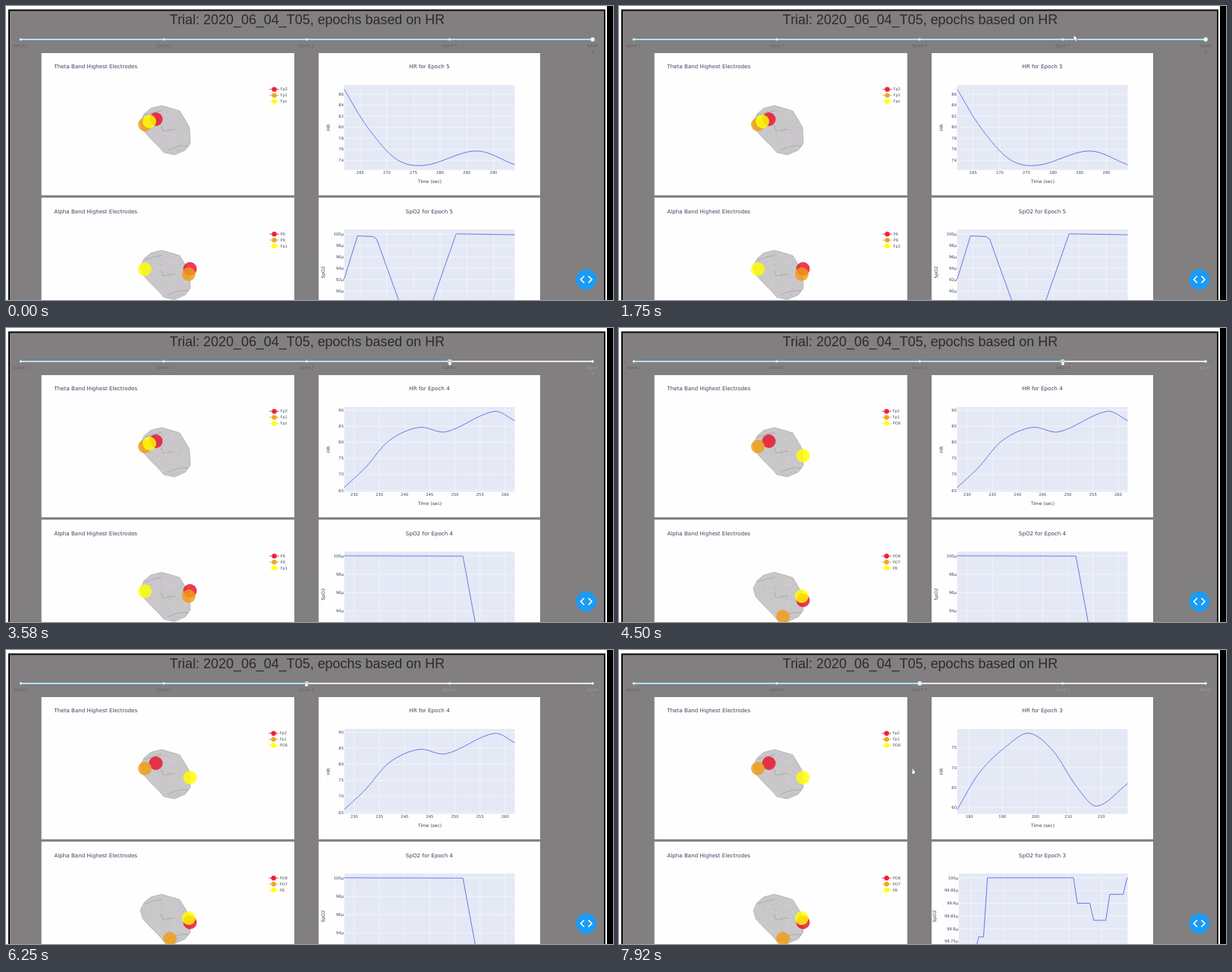
Recreate the animation shown at these times as an HTML page with a canvas. Size 800x387 px, loop 8 s.

```html
<!DOCTYPE html>
<html lang="en">
<head>
<meta charset="utf-8">
<title>Trial dashboard</title>
<style>
  html, body { margin: 0; width: 100%; height: 100%; overflow: hidden; background: #827f80; }
  canvas { display: block; }
</style>
</head>
<body>
<canvas id="stage" width="800" height="387"></canvas>
<script>
const ctx = document.getElementById('stage').getContext('2d');
const LOOP = 8000;
const GRAY = '#827f80', INK = '#38425a', LINE = '#686ee8';
const RANK_COLORS = ['#e8112d', '#f09c14', '#ffff00'];
const PLOT_FONT = '"DejaVu Sans", Verdana, sans-serif';
const UI_FONT = '"Liberation Sans", Arial, sans-serif';

// Smooth curve through a few key points, with slopes taken from the neighbours.
function smooth(keys) {
  const last = keys.length - 1;
  const slope = i => {
    const a = keys[Math.max(i - 1, 0)], b = keys[Math.min(i + 1, last)];
    return (b[1] - a[1]) / (b[0] - a[0]);
  };
  const points = [keys[0]];
  for (let i = 0; i < last; i++) {
    const [x0, y0] = keys[i], [x1, y1] = keys[i + 1], w = x1 - x0;
    for (let k = 0.125; k <= 1; k += 0.125) {
      const ease = k * k * (3 - 2 * k);
      const bend = w * k * (1 - k) * (slope(i) * (1 - k) - slope(i + 1) * k);
      points.push([x0 + w * k, y0 + (y1 - y0) * ease + bend]);
    }
  }
  return points;
}

// Plateaus joined by short ramps; each step is [time, new level].
function plateaus(start, end, level, steps) {
  const points = [[start, level]];
  for (const [x, next] of steps) {
    points.push([x - 0.6, level], [x + 0.6, next]);
    level = next;
  }
  return [...points, [end, level]];
}

const epochs = {
  5: {
    hr: smooth([[262, 86.9], [266.3, 80.1], [271.8, 74.2], [277.1, 73.1], [286.8, 75.7], [294, 73.2]]),
    sp: [[262, 92.1], [264.5, 99.67], [267.4, 99.55], [268.1, 99.1], [272.9, 86.7], [278, 86.7], [283, 100.03], [294, 99.87]]
  },
  4: {
    hr: smooth([[228, 65.9], [232.3, 72.3], [236.9, 80.5], [242.9, 84.7], [248.2, 83.3], [257.8, 89.7], [261.9, 86.8]]),
    sp: [[228, 100], [251.6, 99.97], [254.4, 91.7], [261.9, 91.7]]
  },
  3: {
    hr: smooth([[176.3, 59.4], [183, 68.7], [191.5, 75.6], [198.1, 78.7], [205.3, 74.3], [212.6, 65.1], [218.6, 60.3], [228, 66]]),
    sp: plateaus(176.3, 228, 99.7, [[181.8, 99.768], [184.5, 100], [212, 99.9], [217, 99.833], [221.9, 99.935], [227.2, 100]])
  }
};

// Electrode sites, relative to the upper panel.
const sites = {
  Fp1: [183, 156], Fp2: [197.5, 149], Fpz: [189, 152], P6: [242.5, 155.5],
  P8: [240.8, 162.5], PO7: [216, 189.5], PO8: [242.5, 168]
};
const rankings = {
  theta: [['Fp2', 'Fp1', 'Fpz'], ['Fp2', 'Fp1', 'PO8']],
  alpha: [['P6', 'P8', 'Fp1'], ['PO8', 'PO7', 'P8']]
};

// Cursor stops: time, x, y.
const cursorPath = [
  [1330, 768, 362], [1700, 600, 38], [2080, 596, 41], [2420, 585, 42], [5000, 585, 42],
  [5420, 469.5, 46], [5720, 396, 41], [7420, 396, 41], [7920, 388, 156], [LOOP, 388, 156]
];

const brainShape = new Path2D('M177 152L182 142 191 134.5 205 131 221 135.5 229 138 237 151 242 160 243 181 ' +
  '236 190 222 196 208 193 203 187 190 174 180 163Z');
const brainFolds = new Path2D('M205 157Q205 167 212 164T224 163M183 144Q193 139 205 138M213 190Q226 183 240 184');
const arrow = new Path2D('M0 0V7L1.7 5.5 2.9 8 4 7.5 2.9 5.1H5Z');
const hand = new Path2D('M-1.2 .6Q-.5-.3 .1 .6V2.6L2.2 3.2 1.4 7H-1.2L-2.8 4.6-1.2 4.4Z');

function text(str, x, y, size, { align = 'left', color = INK, font = PLOT_FONT } = {}) {
  ctx.font = `${size}px ${font}`;
  ctx.textAlign = align;
  ctx.textBaseline = 'middle';
  ctx.fillStyle = color;
  ctx.fillText(str, x, y);
}

function rect(x, y, w, h, color) {
  ctx.fillStyle = color;
  ctx.fillRect(x, y, w, h);
}

function dot(x, y, r, color) {
  ctx.fillStyle = color;
  ctx.beginPath();
  ctx.arc(x, y, r, 0, Math.PI * 2);
  ctx.fill();
}

function polyline(points, color, width) {
  ctx.strokeStyle = color;
  ctx.lineWidth = width;
  ctx.lineJoin = 'round';
  ctx.beginPath();
  for (const [x, y] of points) ctx.lineTo(x, y);
  ctx.stroke();
}

function verticalLabel(str, x, y) {
  ctx.save();
  ctx.translate(x, y);
  ctx.rotate(-Math.PI / 2);
  text(str, 0, 0, 5.95, { align: 'center' });
  ctx.restore();
}

// Linear axis with round tick values, about eight to the range.
function axis(values, padding, from, to) {
  const low = Math.min(...values), high = Math.max(...values);
  const pad = (high - low) * padding;
  const min = low - pad, max = high + pad;
  const rough = (max - min) / 8, unit = 10 ** Math.floor(Math.log10(rough));
  const step = unit * [1, 2, 5, 10].find(n => n * unit >= rough);
  const ticks = [];
  for (let n = Math.ceil(min / step); n * step <= max; n++) ticks.push(+(n * step).toFixed(2));
  return { ticks, at: v => from + (v - min) / (max - min) * (to - from) };
}

function plot(name, epoch, data, left, top, unit) {
  const right = 670.5, bottom = top + 111.7;
  const x = axis(data.map(p => p[0]), 0, left, right);
  const y = axis(data.map(p => p[1]), 1 / 18, bottom, top);
  text(`${name} for Epoch ${epoch}`, 558, top - 23.6, 7.15, { align: 'center' });
  rect(left, top, right - left, bottom - top, '#e5e9f5');
  for (const v of x.ticks) {
    polyline([[x.at(v), top], [x.at(v), bottom]], '#f4f6fb', 0.8);
    text(v, x.at(v), bottom + 4, 5.15, { align: 'center' });
  }
  for (const v of y.ticks) {
    polyline([[left, y.at(v)], [right, y.at(v)]], '#f4f6fb', 0.8);
    text(v + unit, left - 0.8, y.at(v) + 0.3, 5.15, { align: 'right' });
  }
  polyline(data.map(p => [x.at(p[0]), y.at(p[1])]), LINE, 0.95);
}

function brain() {
  ctx.save();
  ctx.fillStyle = '#c9c7c9';
  ctx.fill(brainShape);
  ctx.strokeStyle = 'rgba(110,110,110,.45)';
  ctx.lineWidth = 0.7;
  ctx.stroke(brainShape);
  ctx.stroke(brainFolds);
  ctx.clip(brainShape);
  let seed = 7;
  const random = () => (seed = seed * 16807 % 2147483647) / 2147483647;
  for (let i = 0; i < 160; i++) {
    const x = 176 + random() * 68, y = 131 + random() * 66;
    rect(x, y, 2, 1.2, i % 2 ? 'rgba(255,255,255,.14)' : 'rgba(90,90,90,.08)');
  }
  ctx.restore();
}

function brainPanel(title, top, names) {
  ctx.save();
  ctx.translate(0, top);
  text(title, 63.5, 80.4, 7.1);
  brain();
  ctx.globalAlpha = 0.82;
  names.forEach((name, i) => dot(...sites[name], 9, RANK_COLORS[i]));
  ctx.globalAlpha = 0.9;
  ctx.font = `5.1px ${PLOT_FONT}`;
  const labelX = 371 - Math.max(...names.map(name => ctx.measureText(name).width));
  names.forEach((name, i) => {
    const y = 109.7 + i * 7.9;
    polyline([[labelX - 14.3, y], [labelX - 1.8, y]], RANK_COLORS[i], 0.9);
    dot(labelX - 8, y, 3.2, RANK_COLORS[i]);
    text(name, labelX, y + 0.2, 5.1);
  });
  ctx.restore();
}

function slider(epoch) {
  const tickX = i => 19.5 + (i - 1) * 188.4;
  rect(19, 43, 754, 2, '#e6e6e6');
  rect(19, 43, tickX(epoch) - 19, 2, '#aee0ee');
  for (let i = 1; i <= 5; i++) {
    const x = tickX(i), active = i <= epoch;
    dot(x, 44, 1.8, active ? '#aee0ee' : '#e9e9e9');
    dot(x, 44, 1.1, '#fff');
    const style = { align: 'center', color: active ? '#636061' : '#9b9999', font: UI_FONT };
    (i < 5 ? ['Epoch ' + i] : ['Epoch', '5']).forEach((line, row) => text(line, x, 53 + row * 7.3, 5.1, style));
  }
  dot(tickX(epoch), 44, 3, '#a8def2');
  dot(tickX(epoch), 44, 2.2, '#f4fbfd');
}

function codeButton() {
  dot(764.8, 360, 13.4, '#1a9bf5');
  for (const side of [-1, 1]) {
    const x = 764.8 + side * 2.8;
    polyline([[x, 355.5], [x + side * 4.5, 360], [x, 364.5]], '#fff', 1.7);
  }
}

function cursor(t) {
  const next = cursorPath.findIndex(stop => stop[0] > t);
  if (next < 1) return;
  const [t0, x0, y0] = cursorPath[next - 1], [t1, x1, y1] = cursorPath[next];
  const k = (t - t0) / (t1 - t0);
  const shape = (t >= 2420 && t < 5050) || t >= 5720 ? hand : arrow;
  ctx.save();
  ctx.translate(x0 + (x1 - x0) * k, y0 + (y1 - y0) * k);
  ctx.lineWidth = 0.8;
  ctx.strokeStyle = '#555';
  ctx.stroke(shape);
  ctx.fillStyle = '#fff';
  ctx.fill(shape);
  ctx.restore();
}

function draw(t) {
  const after = (...times) => times.filter(time => t >= time).length;
  const hrEpoch = 5 - after(3420, 7080), spEpoch = 5 - after(3330, 6830);
  const spShift = spEpoch === 3 ? 2 : 0; // wider tick labels

  rect(0, 0, 800, 387, '#000');
  rect(0, 0, 792, 387, '#fefefe');
  rect(3, 4.5, 787, 383, '#0a0a0a');
  rect(5, 6.5, 783, 381, GRAY);
  text('Trial: 2020_06_04_T05, epochs based on HR', 397, 19.3, 17.95, { align: 'center', color: '#2c2a2b', font: UI_FONT });
  slider(5 - after(2670, 6080));

  for (const y of [62, 252.3]) {
    rect(46.7, y, 333.3, 187.2, '#fefefe');
    rect(412, y, 292, 187.2, '#fefefe');
  }
  brainPanel('Theta Band Highest Electrodes', 0, rankings.theta[after(4000)]);
  brainPanel('Alpha Band Highest Electrodes', 190.5, rankings.alpha[after(4330)]);

  plot('HR', hrEpoch, epochs[hrEpoch].hr, 445.7, 104, '');
  verticalLabel('HR', 425, 160);
  text('Time (sec)', 558.5, 231.7, 5.95, { align: 'center' });
  plot('SpO2', spEpoch, epochs[spEpoch].sp, 445.7 + spShift, 294.3, 'µ');
  verticalLabel('SpO2', 418.5 - spShift, 350.5);

  codeButton();
  cursor(t);
}

function frame() {
  draw(performance.now() % LOOP);
  requestAnimationFrame(frame);
}
frame();
</script>
</body>
</html>
```
